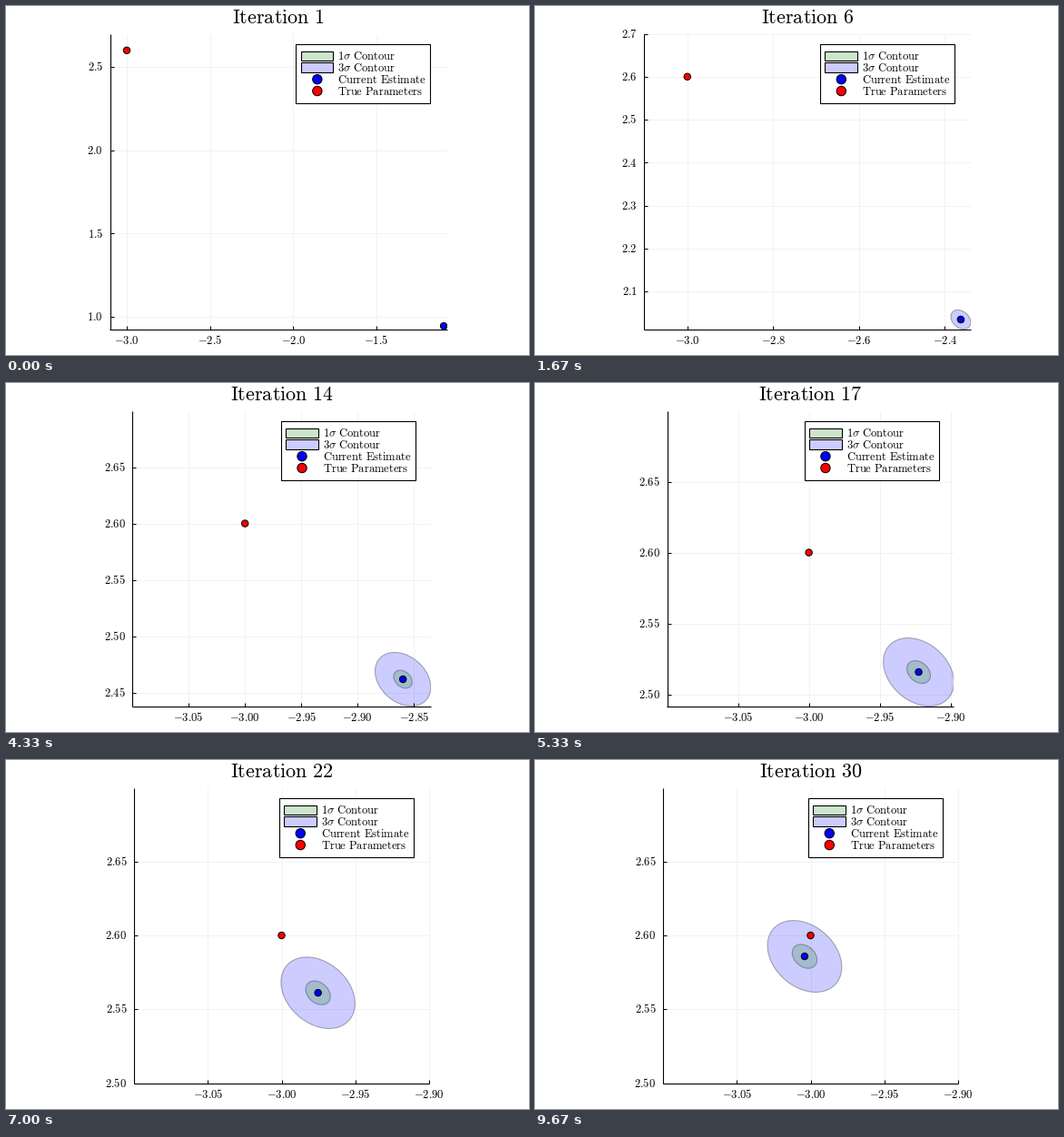
A matplotlib script that plays this animation: 576x384 px, repeating every 10000 ms.

```python
import math

import numpy as np
import matplotlib.pyplot as plt
from matplotlib.animation import FuncAnimation
from matplotlib.patches import Circle, Polygon, Rectangle

plt.rcParams["mathtext.fontset"] = "cm"

W, H, DPI = 576, 384, 96
PT = 72 / DPI                      # points per pixel
LOOP, TICK, ITERATIONS = 10000, 40, 30
TOP, BOTTOM = 30.5, 355.5          # plot area, in pixels
X_MIN, Y_MAX = -3.1, 2.7
TRUE = (-3.0, 2.6)
LIMIT = (-3.0139, 2.5943)          # where the estimate settles
RHO = -0.3
BLUE, RED, GRID = "#0000ff", "#ff0000", "#f2f2f2"
STEPS = ((1, 1.0), (5, 0.9), (2, 0.7), (2.5, 0.5))

fig = plt.figure(figsize=(W / DPI, H / DPI), dpi=DPI, facecolor="white")
ax = fig.add_axes([0, 0, 1, 1])


def state(k):
    """Estimate and half extents of the 3-sigma ellipse at iteration k."""
    err = 1.9447 * math.exp(-0.165 * k) * k ** -0.1427
    center = (LIMIT[0] + 1.1635 * err, LIMIT[1] - err)
    return center, (0.0252 - 0.0035 * err, 0.0243 - 0.0036 * err)


def ticks(lo, hi):
    """Pick the best scoring tick step; return tick values and decimals."""
    best, choice = -1, None
    for z in (-2, -1):
        for q, nice in STEPS:
            step = q * 10 ** z
            first = math.ceil(lo / step - 1e-6)
            last = math.floor(hi / step + 1e-6)
            n = last - first + 1
            if not 4 <= n <= 8:
                continue
            cover = (hi - lo) / ((n - 1) * step)
            score = 0.25 * (1 - abs(n - 5) / 5) + 0.25 * nice + 0.5 * cover
            if round(score, 6) >= best:
                best = round(score, 6)
                choice = step, [i * step for i in range(first, last + 1)]
    step, values = choice
    if step < 0.09:
        values = [v for v in values
                  if min(abs(v - X_MIN), abs(v - Y_MAX)) > 1e-6]
    decimals = 1 if abs(step * 10 - round(step * 10)) < 1e-6 else 2
    return values, decimals


def line(xs, ys, color="black", width=1.0, z=1):
    ax.plot(xs, ys, color=color, lw=width * PT, zorder=z,
            solid_capstyle="butt")


def text(x, y, s, size=12.6, ha="center", z=8):
    ax.text(x, y, f"${s}$", fontsize=size * PT, ha=ha, va="baseline",
            color="black", zorder=z)


def roman(s):
    return r"\mathrm{" + s.replace(" ", r"\ ") + "}"


def dot(x, y, r, color, z):
    return ax.add_patch(Circle((x, y), r, fc=color, ec="black", lw=PT,
                               zorder=z))


def box(x, y, w, h, color, z):
    ax.add_patch(Rectangle((x, y), w, h, fc=color, ec="black", lw=1.1 * PT,
                           zorder=z))


def legend(left):
    box(left, 41.5, 148, 65, "white", 6)
    rows = [55 + 12.85 * i for i in range(4)]
    for y, color in zip(rows, ("#cce6cc", "#ccccff")):
        box(left + 5.5, y - 5.5, 35.5, 10.5, color, 7)
    for y, color in zip(rows[2:], (BLUE, RED)):
        dot(left + 23.4, y, 5.2, color, 7)
    labels = (r"1\sigma" + roman(" Contour"), r"3\sigma" + roman(" Contour"),
              roman("Current Estimate"), roman("True Parameters"))
    for y, s in zip(rows, labels):
        text(left + 46, y + 4.1, s, ha="left")


def draw(frame):
    ax.clear()
    ax.set_xlim(0, W)
    ax.set_ylim(H, 0)
    ax.axis("off")

    # an iteration shows from the frame in which it begins
    k = 1 + ((frame + 1) * TICK - 1) * ITERATIONS // LOOP
    (cx, cy), (hx, hy) = state(k)
    x_max = max(-2.9, cx + hx)
    y_min = min(2.5, cy - hy)
    x_ticks, x_dec = ticks(X_MIN, x_max)
    y_ticks, y_dec = ticks(y_min, Y_MAX)

    scale = (BOTTOM - TOP) / (Y_MAX - y_min)
    width = (x_max - X_MIN) * scale
    mid = 300.2 if y_dec == 1 else 303.5
    left, right = mid - width / 2, mid + width / 2

    def px(x):
        return left + (x - X_MIN) * scale

    def py(y):
        return TOP + (Y_MAX - y) * scale

    for v in x_ticks:
        x = px(v)
        line([x, x], [TOP, BOTTOM], GRID)
        line([x, x], [BOTTOM, BOTTOM - 4], z=5)
        text(x, 371.6, f"{v:.{x_dec}f}")
    for v in y_ticks:
        y = py(v)
        line([left, right], [y, y], GRID)
        line([left, left + 4], [y, y], z=5)
        text(left - 7.6, y + 4.2, f"{v:.{y_dec}f}", ha="right")
    line([left, left], [TOP, BOTTOM + 0.5], width=1.1, z=5)
    line([left - 0.5, right], [BOTTOM, BOTTOM], width=1.1, z=5)

    area = Rectangle((left, TOP), width, BOTTOM - TOP, transform=ax.transData)
    t = np.linspace(0, 2 * np.pi, 121)
    ex = hx * np.cos(t)
    ey = hy * (RHO * np.cos(t) + math.sqrt(1 - RHO ** 2) * np.sin(t))
    for part, rgb in ((1, (0, 0, 1)), (1 / 3, (0, 0.5, 0))):
        pts = np.column_stack([px(cx + part * ex), py(cy + part * ey)])
        shape = ax.add_patch(Polygon(pts, fc=(*rgb, 0.2), ec=(0, 0, 0, 0.3),
                                     lw=1.1 * PT, zorder=3))
        shape.set_clip_path(area)

    for (x, y), color in (((cx, cy), BLUE), (TRUE, RED)):
        dot(px(x), py(y), 3.7, color, 4).set_clip_path(area)

    legend(right - 9 - 0.025 * width - 148)
    text(mid, 19, roman(f"Iteration {k}"), size=22.1)
    return []


anim = FuncAnimation(fig, draw, frames=LOOP // TICK, interval=TICK,
                     repeat=True, repeat_delay=0, blit=False)
plt.show()
```
